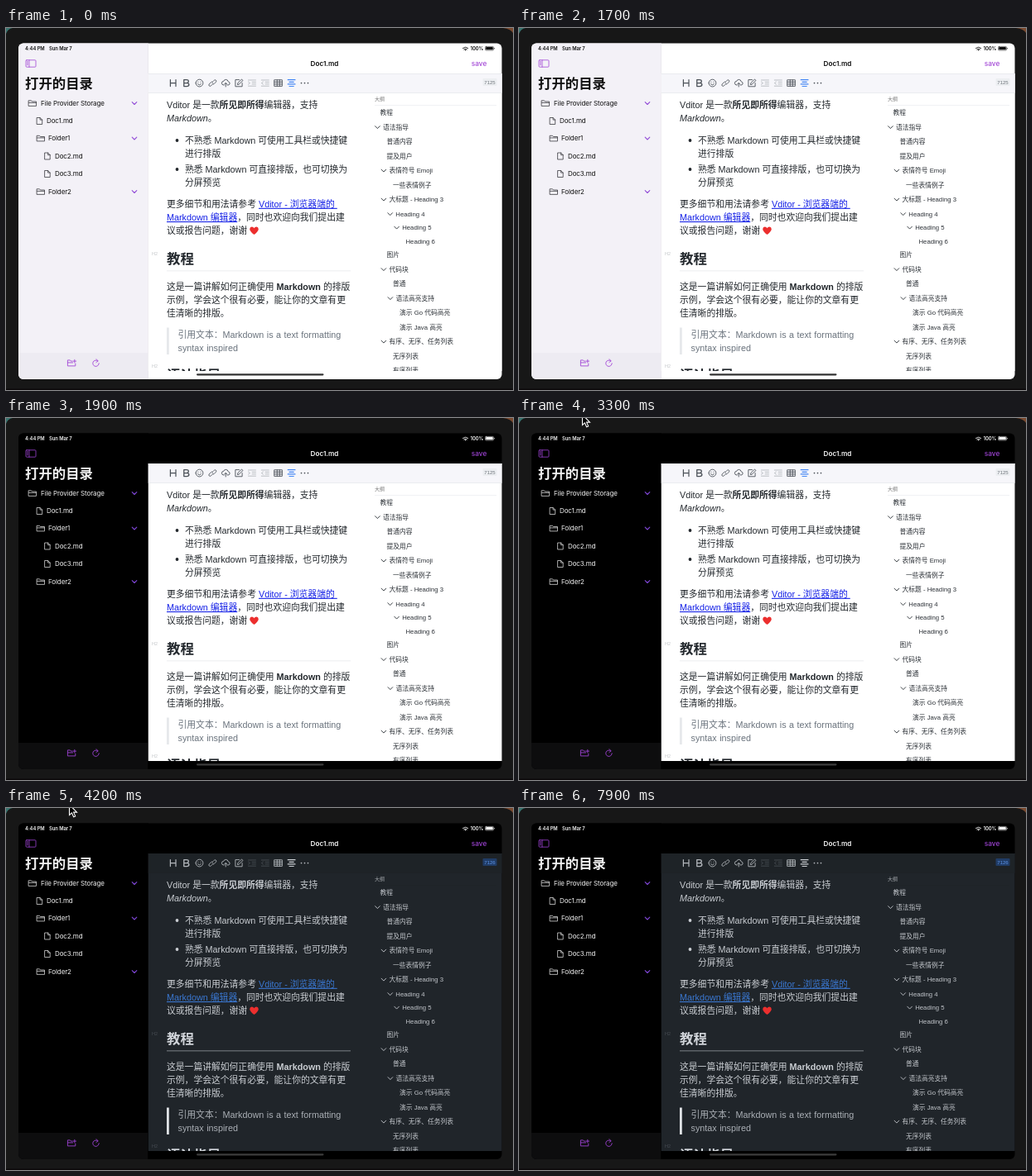
These frames come from a looping animation (612 by 438 pixels, 8 s). An HTML page:

```html
<!DOCTYPE html>
<html lang="zh-CN">
<head>
<meta charset="utf-8">
<title>Markdown editor theme switch</title>
<style>
html, body { margin: 0; width: 100%; height: 100%; overflow: hidden; background: #171717; }
svg { display: block; width: 612px; height: 438px; }
svg {
  --shell: #fff; --side: #f3f1f7; --foot: #edebf2; --label: #111; --icon: #3c3c40;
  --tint: #a348d6; --fold: #9450d8; --home: #333; --rule: #e1dfe6;
  --page: #fff; --bar: #f6f6fa; --edge: #e1e4e8; --tool: #4a5057; --dim: #b4b8bd;
  --active: #4285f4; --text: #24292e; --head: #24292e; --link: #1420e6; --quote: #6a737d;
  --mark: #e6e8eb; --line: #eaecef; --item: #2b3036; --mini: #777; --gutter: #c4c7ca;
  --badge: #eceef1; --count: #70767d;
}
svg.dark {
  --shell: #000; --side: #000; --foot: #0d0d0e; --label: #f2f2f2; --icon: #d4d4d4;
  --tint: #9c42d2; --fold: #7d45d4; --home: #3c3c3c; --rule: #000;
}
svg.night {
  --page: #20252a; --bar: #1e2327; --edge: #1e2226; --tool: #b4b8bd; --dim: #464c52;
  --active: #ced2d6; --text: #20252a; --head: #20252a; --link: #2869c0; --quote: #596068;
  --mark: #dfe2e5; --line: #20252a; --item: #c3c7cc; --mini: #a4a8ad; --gutter: #474d53;
  --badge: #203c66; --count: #5c93e6;
}
svg.ready {
  --text: #c9cdd2; --head: #d1d5da; --link: #3a77d0; --quote: #abb0b6; --line: #858a90;
}
text { white-space: pre; font-family: "Liberation Sans", "Noto Sans CJK SC", "Noto Sans CJK", sans-serif; }
.ui text { font-family: Inter, "Noto Sans CJK SC", "Noto Sans CJK", sans-serif; fill: var(--label); }
.ui .tree { font-size: 8px; letter-spacing: -.1px; }
.ui .status { font-size: 5.8px; font-weight: 600; letter-spacing: -.05px; }
.ui .save { fill: var(--tint); }
.doc { font-size: 10.8px; fill: var(--text); }
.doc .h { font-size: 16.4px; font-weight: bold; fill: var(--head); }
.doc .q { fill: var(--quote); word-spacing: .45px; }
.doc .link { fill: var(--link); text-decoration: underline; }
.doc .g { font-size: 5.5px; fill: var(--gutter); }
.toc { font-size: 7.75px; fill: var(--item); }
.stroke { fill: none; stroke-linecap: round; stroke-linejoin: round; }
/* the quote sits higher until the content theme has loaded */
.night:not(.ready) .quote { transform: translateY(-5px); }
#cursor { visibility: hidden; }
.pointer #cursor { visibility: visible; }
</style>
</head>
<body>
<svg id="stage" viewBox="0 0 612 438" xmlns="http://www.w3.org/2000/svg"></svg>
<script>
const LOOP = 8000;
const STEPS = [
  [0, ''],
  [1900, 'dark'],
  [2800, 'dark pointer'],
  [3400, 'dark night pointer'],
  [3500, 'dark night ready pointer'],
  [5800, 'dark night ready']
];

const text = (x, y, s, cls = '', extra = '') =>
  `<text x="${x}" y="${y}" class="${cls}" ${extra}>${s}</text>`;
const rect = (x, y, w, h, fill, r = 0) =>
  `<rect x="${x}" y="${y}" width="${w}" height="${h}" rx="${r}" fill="${fill}"/>`;
const path = (x, y, d, color, w = 0.9) =>
  `<path class="stroke" transform="translate(${x} ${y})" d="${d}" stroke="${color}" stroke-width="${w}"/>`;
const circle = r => `M${-r} 0a${r} ${r} 0 1 0 ${2 * r} 0a${r} ${r} 0 1 0 ${-2 * r} 0`;

const FOLDER = 'M-4.5-3.2h3l1 1.2h5v5.4h-9zM-4.5-.6h9';
const FILE = 'M-3-4h3.6L3.2-1.4V4H-3zM.6-4v2.6h2.6';
const CHEVRON = 'M-2.8-1.4L0 1.5 2.8-1.4';

function frame() {
  return rect(0, 0, 612, 438, '#171717') +
    '<path d="M0 0h8Q2 1 0 7z" fill="#39736f"/><path d="M612 0h-12q9 1 12 6z" fill="#7a4a30"/>' +
    rect(0, 436.5, 612, 1.5, '#0c090a');
}

function sidebar() {
  const rows = [
    [32, 91, 42, 'File Provider Storage', 1],
    [40.5, 112.5, 49, 'Doc1.md', 0],
    [42, 133.5, 51, 'Folder1', 1],
    [50, 155, 59, 'Doc2.md', 0],
    [50, 176.5, 59, 'Doc3.md', 0],
    [42, 198, 51, 'Folder2', 1]
  ];
  let out = rect(15, 18, 156.5, 376, 'var(--side)') + rect(15, 393, 156.5, 33, 'var(--foot)') +
    rect(171, 18, 0.6, 408, 'var(--rule)') +
    path(30, 43, 'M-5-4.2h10q1 0 1 1v6.4q0 1-1 1h-10q-1 0-1-1v-6.4q0-1 1-1zM-2-4.2v8.4M-4.6-2.2h1.2M-4.6-.4h1.2M-4.6 1.4h1.2', 'var(--tint)', 0.8) +
    text(23, 72.8, '打开的目录', '', 'font-size="16.4" font-weight="bold"');
  for (const [ix, y, tx, name, folder] of rows) {
    out += path(ix, y, folder ? FOLDER : FILE, 'var(--icon)', 0.8) + text(tx, y + 2.9, name, 'tree');
    if (folder) out += path(155, y, CHEVRON, 'var(--fold)', 1.1);
  }
  return out +
    path(79, 405.5, 'M1-2.4h-1.6l-1-1.2h-3v7h9.4V.6M-4.6-.6H1.6M3.8-4.2v3.6M2-2.4h3.6', 'var(--tint)', 0.9) +
    path(108.5, 405.5, 'M2.4-2.6A3.7 3.7 0 1 0 3.7 .2M.6-4.8L2.6-2.6.4-.9', 'var(--tint)', 0.9);
}

function topBar() {
  const wifi = path(554.6, 26.6, 'M-3.1-2.2q3.1-2.6 6.2 0M-1.8-.7q1.8-1.5 3.6 0', 'var(--label)', 0.9) +
    '<circle cx="554.6" cy="26.8" r=".8" fill="var(--label)"/>';
  const battery = path(578.5, 22.4, 'M1 0h8q1 0 1 1v2.6q0 1-1 1h-8q-1 0-1-1v-2.6q0-1 1-1z', 'var(--label)', 0.5) +
    rect(579.2, 23.1, 8.6, 3.2, 'var(--label)', 0.6) + rect(589.3, 23.9, 0.8, 1.6, 'var(--label)', 0.4);
  return text(23, 26.8, '4:44 PM', 'status') + text(52, 26.8, 'Sun Mar 7', 'status') +
    text(576.3, 26.8, '100%', 'status', 'text-anchor="end"') + wifi + battery +
    text(384.5, 46, 'Doc1.md', '', 'font-size="8.2" font-weight="600" text-anchor="middle"') +
    text(571, 46, 'save', 'save', 'font-size="8.3" font-weight="500" text-anchor="middle"');
}

function toolbar() {
  const lines = 'M-4.5-3.6h9M-4.5 3.6h9M.2-1.2h4.3M.2 1.2h4.3';
  const icons = [
    ['M-3.3-4v8M3.3-4v8M-3.3 0h6.6', 'tool', 1.2],
    ['M-2.8-4h3q2.5 0 2.5 2T.2 0h-3zM-2.8 0h3.4q2.7 0 2.7 2T.6 4h-3.4z', 'tool', 1.3],
    [circle(4.4) + 'M-2 1.2q2 2.4 4 0M-1.6-1.4v.2M1.6-1.4v.2', 'tool'],
    ['M-.8 2.2L-2 3.4q-1 1-2 0t0-2.2L-1.8-1q1-1 2.2 0M.8-2.2L2-3.4q1-1 2 0t0 2.2L1.8 1q-1 1-2.2 0', 'tool'],
    ['M-2 2.4h-.6Q-4.8 2.2-4.8 0T-2.6-2.1Q-2-4.2.2-4.2T3-1.8Q4.9-1.4 4.9.4T3 2.4H2M0 4.4V0M-1.7 1.5L0-.2 1.7 1.5', 'tool'],
    ['M.4-4h-4.6v8.2h8.2V0M-1.6 1.6l.4-1.8L3.4-4.6 4.9-3.1.2 1.4z', 'tool'],
    [lines + 'M-4.5-1.5L-2.4 0-4.5 1.5', 'dim'],
    [lines + 'M-2.4-1.5L-4.5 0-2.4 1.5', 'dim'],
    ['M-4.6-3.8h9.2v7.6h-9.2zM-4.6-1.3h9.2M-4.6 1.3h9.2M-1.5-3.8v7.6M1.5-3.8v7.6', 'tool'],
    ['M-4.4-3.9h8.8M-2.6-1.3h5.2M-4.4 1.3h8.8M-2.6 3.9h5.2', 'active', 1.2],
    ['M-4 0h.01M0 0h.01M4 0h.01', 'tool', 1.7]
  ];
  let out = rect(171.5, 55, 427.5, 23.5, 'var(--bar)') +
    rect(171.5, 55, 427.5, 0.6, 'var(--edge)') + rect(171.5, 78, 427.5, 0.6, 'var(--edge)');
  icons.forEach(([d, color, w], i) => out += path(201.7 + i * 15.88, 66.6, d, `var(--${color})`, w));
  return out + rect(575.5, 61, 17, 9, 'var(--badge)', 1) +
    `<text id="count" x="584" y="67.7" font-size="6" text-anchor="middle" fill="var(--count)"></text>`;
}

function article() {
  const bold = s => `<tspan font-weight="bold">${s}</tspan>`;
  const link = s => `<tspan class="link">${s}</tspan>`;
  const lines = [
    [194, 97, `Vditor 是一款${bold('所见即所得')}编辑器，支持`],
    [194, 113.3, '<tspan font-style="italic">Markdown</tspan>。'],
    [216, 139.5, '不熟悉 Markdown 可使用工具栏或快捷键'],
    [216, 155.8, '进行排版'],
    [216, 174.6, '熟悉 Markdown 可直接排版，也可切换为'],
    [216, 190.8, '分屏预览'],
    [194, 216.8, `更多细节和用法请参考 ${link('Vditor - 浏览器端的 ')}`],
    [194, 233, `${link('Markdown 编辑器')}，同时也欢迎向我们提出建`],
    [194, 249, '议或报告问题，谢谢'],
    [194, 284.6, '教程', 'h'],
    [194, 317, `这是一篇讲解如何正确使用 ${bold('Markdown')} 的排版`],
    [194, 333, '示例，学会这个很有必要，能让你的文章有更'],
    [194, 349.2, '佳清晰的排版。'],
    [194, 425.8, '语法指导', 'h'],
    [176, 275, 'H2', 'g'],
    [176, 411, 'H2', 'g']
  ];
  const quote = rect(194, 362.5, 2.8, 32.5, 'var(--mark)') +
    text(207.5, 375, '引用文本：Markdown is a text formatting', 'q') +
    text(207.5, 391, 'syntax inspired', 'q');
  return '<g class="doc">' + lines.map(l => text(...l)).join('') +
    '<circle cx="206.5" cy="136" r="1.9"/><circle cx="206.5" cy="171" r="1.9"/>' +
    `<g class="quote">${quote}</g></g>` +
    '<path transform="translate(299.5 245)" d="M0 5Q-5.3 1-5.3-1.8-5.2-4.4-2.7-4.5-.8-4.5 0-2.7.8-4.5 2.7-4.5 5.2-4.4 5.3-1.8 5.3 1 0 5z" fill="#ec2f2e"/>' +
    rect(194, 293.4, 222, 0.9, 'var(--line)');
}

function outline() {
  // x, label, has children
  const items = [
    [451.5, '教程'], [455, '语法指导', 1], [459.5, '普通内容'], [459.5, '提及用户'],
    [462.5, '表情符号 Emoji', 1], [467, '一些表情例子'], [462.5, '大标题 - Heading 3', 1],
    [470.3, 'Heading 4', 1], [478.2, 'Heading 5', 1], [482.5, 'Heading 6'], [459.5, '图片'],
    [462.5, '代码块', 1], [467, '普通'], [470.5, '语法高亮支持', 1], [475, '演示 Go 代码高亮'],
    [475, '演示 Java 高亮'], [462.5, '有序、无序、任务列表', 1], [467, '无序列表'], [467, '有序列表']
  ];
  let out = text(445, 88.2, '大纲', '', 'font-size="6" fill="var(--mini)"') +
    rect(445, 93.4, 147, 0.5, 'var(--edge)') + '<g class="toc">';
  let y = 102.6;
  for (const [x, s, open] of items) {
    out += text(x, y + 2.8, s);
    if (open) out += path(x - 6.6, y, CHEVRON, 'var(--item)', 0.9);
    y += s.startsWith('Heading') ? 16.5 : 17.5; // Latin-only rows are lower
  }
  return out + '</g>';
}

const stage = document.getElementById('stage');
stage.innerHTML =
  '<defs><clipPath id="screen"><rect x="15" y="18.5" width="583.5" height="406.5" rx="6"/></clipPath>' +
  '<clipPath id="pane"><rect x="171.5" y="55" width="427.5" height="360"/></clipPath></defs>' +
  frame() +
  '<g clip-path="url(#screen)">' + rect(15, 18, 584, 408, 'var(--shell)') +
  '<g class="ui">' + sidebar() + topBar() + '</g>' +
  '<g clip-path="url(#pane)">' + rect(171.5, 55, 427.5, 360, 'var(--page)') +
  toolbar() + article() + outline() + '</g>' +
  rect(230, 418.2, 153.5, 2.2, 'var(--home)', 1.1) + '</g>' +
  '<path id="cursor" transform="translate(76.5 -4)" d="M0 0v12.4l2.9-2.6 2.2 5 2.1-.9-2.1-4.8h3.9z" fill="#000" stroke="#fff" stroke-width="1.1"/>';

const count = document.getElementById('count');
let shown = null;
function draw() {
  const t = performance.now() % LOOP;
  const state = STEPS.filter(s => s[0] <= t).pop()[1];
  if (state !== shown) {
    shown = state;
    stage.setAttribute('class', state);
    count.textContent = state.includes('night') ? '7126' : '7125';
  }
  requestAnimationFrame(draw);
}
draw();
</script>
</body>
</html>
```
